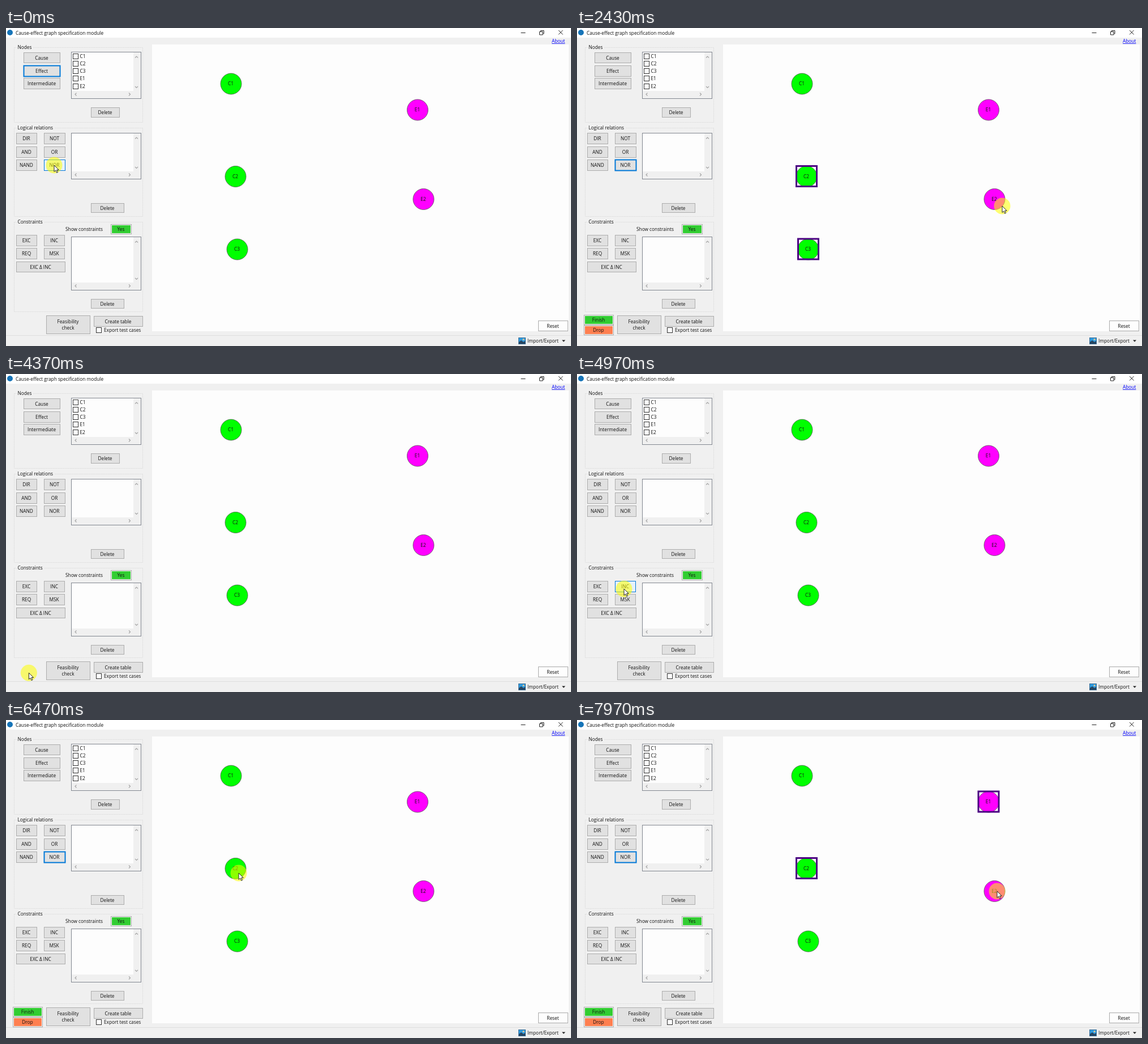
Animation of 998x561 px, one loop 8 s. Source, as an HTML page:

```html
<!DOCTYPE html>
<html lang="en">
<head>
<meta charset="utf-8">
<title>Cause-effect graph</title>
<style>
  html, body { margin: 0; width: 100%; height: 100%; overflow: hidden; background: #f0f0f0; }
  svg { display: block; width: 100%; height: 100%; }
  text { font: 8.3px "Open Sans", "Noto Sans", sans-serif; fill: #111; }
  .mid { text-anchor: middle; }
  .btn rect { fill: #e1e1e1; stroke: #adadad; }
  .btn.focus rect { stroke: #0078d7; stroke-width: 2; }
  .btn.hover rect { fill: #e5f1fb; stroke: #0078d7; stroke-width: 1; }
  .line { fill: none; stroke: #222; }
  .chevron { fill: none; stroke: #a6a6a6; stroke-width: 1.2; }
  .check { fill: #fff; stroke: #333; }
  .group { fill: none; stroke: #dcdcdc; stroke-dasharray: 2 1; }
</style>
</head>
<body>
<svg id="stage" viewBox="0 0 998 561" preserveAspectRatio="none">
  <rect width="998" height="561" fill="#f0f0f0"/>
  <rect width="998" height="17" fill="#fff"/>
  <circle cx="7" cy="8" r="5" fill="#1674b8"/>
  <text x="17" y="11.5">Cause-effect graph specification module</text>
  <path class="line" d="M909.5 8.5h8M942.5 6.5h5.500v5.500h-5.500zM944.500 6v-1.500h5.500v5.500h-1.500M976 4l7.500 7.500m0-7.500l-7.500 7.500"/>
  <text x="964" y="26" style="fill:#00f;text-decoration:underline">About</text>
  <rect x="258" y="29" width="736" height="506" fill="#fdfdfd"/>
  <path d="M0 542.500h998" stroke="#dedede"/>
  <g id="ui"></g>
  <text x="105" y="358">Show constraints</text>
  <g transform="translate(905 546)">
    <rect x=".5" y=".5" width="12" height="11" fill="#2d9be0" stroke="#3c6e96"/>
    <path d="M1 8L5 5L9 8L12 6V11H1Z" fill="#27445f"/>
    <circle cx="9" cy="3.500" r="1.500" fill="#f5c68b"/>
  </g>
  <text x="921" y="555">Import/Export</text>
  <path d="M982 550.500h6l-3 3.200z" fill="#222"/>
  <g id="nodes"></g>
  <g id="cursor">
    <circle r="14.500" fill="#ff0" fill-opacity=".55"/>
    <path d="M0 0V11.500L2.700 9L4.600 13.300L6.500 12.500L4.600 8.300H8.200Z" fill="#fff" stroke="#111" stroke-width=".9"/>
  </g>
</svg>
<script>
const NS = 'http://www.w3.org/2000/svg';
const ui = document.getElementById('ui');
const nodeLayer = document.getElementById('nodes');
const cursor = document.getElementById('cursor');
const LOOP = 8000;

function add(parent, tag, attrs, content = '') {
  const el = document.createElementNS(NS, tag);
  for (const key in attrs) el.setAttribute(key, attrs[key]);
  el.textContent = content;
  return parent.appendChild(el);
}

// Box edges are given as left, top, right, bottom pixels.
const box = (parent, x, y, r, b, attrs) =>
  add(parent, 'rect', { x: x + .5, y: y + .5, width: r - x - 1, height: b - y - 1, ...attrs });
const label = (parent, x, y, text, cls = 'mid') => add(parent, 'text', { x, y, class: cls }, text);

function group(y, b, title, gap) {
  box(ui, 14, y, 242, b, { class: 'group' });
  add(ui, 'rect', { x: 19, y: y - 2, width: gap, height: 5, fill: '#f0f0f0' });
  label(ui, 20.500, y + 3, title, '');
}

const buttons = {};
function button(x, y, r, b, text, id = text) {
  const el = add(ui, 'g', { class: 'btn' });
  box(el, x, y, r, b);
  const lines = text.split('|');
  lines.forEach((line, i) =>
    label(el, (x + r) / 2 - .5, (y + b) / 2 + 3 + (i - (lines.length - 1) / 2) * 11, line));
  buttons[id] = { el, x, y, r, b };
}

function colorButton(parent, x, y, r, b, text, fill) {
  box(parent, x, y, r, b, { fill: '#f8f8f8', stroke: '#adadad' });
  add(parent, 'rect', { x: x + 2, y: y + 2, width: r - x - 4, height: b - y - 4, fill });
  label(parent, (x + r) / 2 - .5, (y + b) / 2 + 3, text);
}

function list(y, b) {
  box(ui, 115, y, 239, b, { fill: '#fdfdfd', stroke: '#828790' });
  add(ui, 'path', { fill: '#f0f0f0', d: `M225 ${y + 1}H238V${b - 1}H116V${b - 14}H225Z` });
  add(ui, 'path', {
    class: 'chevron',
    d: `M228 ${y + 10.500}l2.500-2.500l2.500 2.500M228 ${b - 22}l2.500 2.500l2.500-2.500` +
       `M124.500 ${b - 10.500}l-2.500 2.500l2.500 2.500M217 ${b - 10.500}l2.500 2.500l-2.500 2.500`
  });
}

function checkbox(x, y, text, textX) {
  box(ui, x, y, x + 10, y + 10, { class: 'check' });
  label(ui, textX, y + 7.500, text, '');
}

group(34, 167, 'Nodes', 29);
group(176, 333, 'Logical relations', 67);
group(342, 501, 'Constraints', 48);
list(42, 125);
list(185, 267);
list(368, 463);

button(31, 43, 96, 62, 'Cause');
button(31, 66, 96, 86, 'Effect');
button(31, 88, 96, 108, 'Intermediate');
button(150, 140, 201, 158, 'Delete', 'deleteNode');
[['DIR', 'NOT'], ['AND', 'OR'], ['NAND', 'NOR']].forEach(([left, right], i) => {
  const y = 185 + Math.round(i * 23.500);
  button(18, y, 55, y + 20, left);
  button(67, y, 105, y + 20, right);
});
button(150, 309, 209, 326, 'Delete', 'deleteRelation');
[['EXC', 'INC'], ['REQ', 'MSK']].forEach(([left, right], i) => {
  const y = 365 + i * 23;
  button(18, y, 55, y + 20, left);
  button(67, y, 104, y + 20, right);
});
button(18, 412, 105, 431, 'EXC Δ INC');
button(150, 478, 209, 495, 'Delete', 'deleteConstraint');
button(71, 507, 149, 540, 'Feasibility|check');
button(155, 508, 242, 527, 'Create table');
colorButton(ui, 185, 346, 222, 364, 'Yes', '#32cd32');
colorButton(ui, 940, 516, 993, 535, 'Reset', '#fdfdfd');
['C1', 'C2', 'C3', 'E1', 'E2'].forEach((name, i) =>
  checkbox(118, 45 + Math.round(i * 13.150), name, 130.500));
checkbox(159, 528, 'Export test cases', 173);

const actions = add(ui, 'g', {});
colorButton(actions, 12, 506, 65, 524, 'Finish', '#32cd32');
colorButton(actions, 12, 524, 65, 542, 'Drop', '#ff7f50');

const marks = {};
function node(name, x, y) {
  add(nodeLayer, 'circle', {
    cx: x, cy: y, r: 18.500, fill: name[0] === 'C' ? '#0f0' : '#f0f',
    stroke: '#444', 'stroke-width': .7
  });
  marks[name] = add(nodeLayer, 'rect', {
    x: x - 18, y: y - 18.500, width: 36, height: 36, fill: 'none', stroke: '#4b0082', 'stroke-width': 3
  });
  label(nodeLayer, x - .5, y + 2.500, name);
}
node('C1', 397.500, 98.500);
node('C2', 405.500, 262);
node('C3', 408.500, 390.500);
node('E1', 727, 144.500);
node('E2', 737.500, 302);

// Cursor stops: time, x, y.
const path = [
  [0, 85, 242], [200, 85, 242], [1000, 409, 259], [1250, 409, 259],
  [1640, 410, 388], [1800, 410, 388], [2430, 751, 314], [2650, 750, 313],
  [3430, 41, 496], [3600, 39, 532], [4300, 39, 532], [4970, 83, 379],
  [5330, 87, 243], [5770, 87, 243], [6470, 411, 270], [6650, 411, 268],
  [7250, 730, 146], [7430, 730, 146], [7970, 742, 302], [LOOP, 742, 302]
];
const shown = {
  C2: [[1200, 3700], [6570, LOOP]],
  C3: [[1730, 3700]],
  E1: [[7350, LOOP]],
  E2: [[2550, 3700]]
};
const picking = [[170, 3700], [5560, LOOP]];
const within = (t, spans) => spans.some(([from, to]) => t >= from && t < to);
const ease = k => k * k * (3 - 2 * k);
const show = (el, on) => el.setAttribute('visibility', on ? 'visible' : 'hidden');

function cursorAt(t) {
  const i = path.findIndex(stop => stop[0] > t);
  const [t0, x0, y0] = path[i - 1], [t1, x1, y1] = path[i];
  const k = ease((t - t0) / (t1 - t0));
  return [x0 + (x1 - x0) * k, y0 + (y1 - y0) * k];
}

function render(now) {
  const t = now % LOOP;
  const [x, y] = cursorAt(t);
  const active = within(t, picking);
  const focused = t < 170 ? 'Effect' : active ? 'NOR' : '';
  cursor.setAttribute('transform', `translate(${x.toFixed(2)} ${y.toFixed(2)})`);
  show(actions, active);
  for (const name in marks) show(marks[name], within(t, shown[name] || []));
  for (const id in buttons) {
    const b = buttons[id];
    b.el.classList.toggle('focus', id === focused);
    b.el.classList.toggle('hover', x >= b.x && x < b.r && y >= b.y && y < b.b);
  }
}

const start = performance.now();
function tick() {
  render(performance.now() - start);
  requestAnimationFrame(tick);
}
tick();
</script>
</body>
</html>
```
